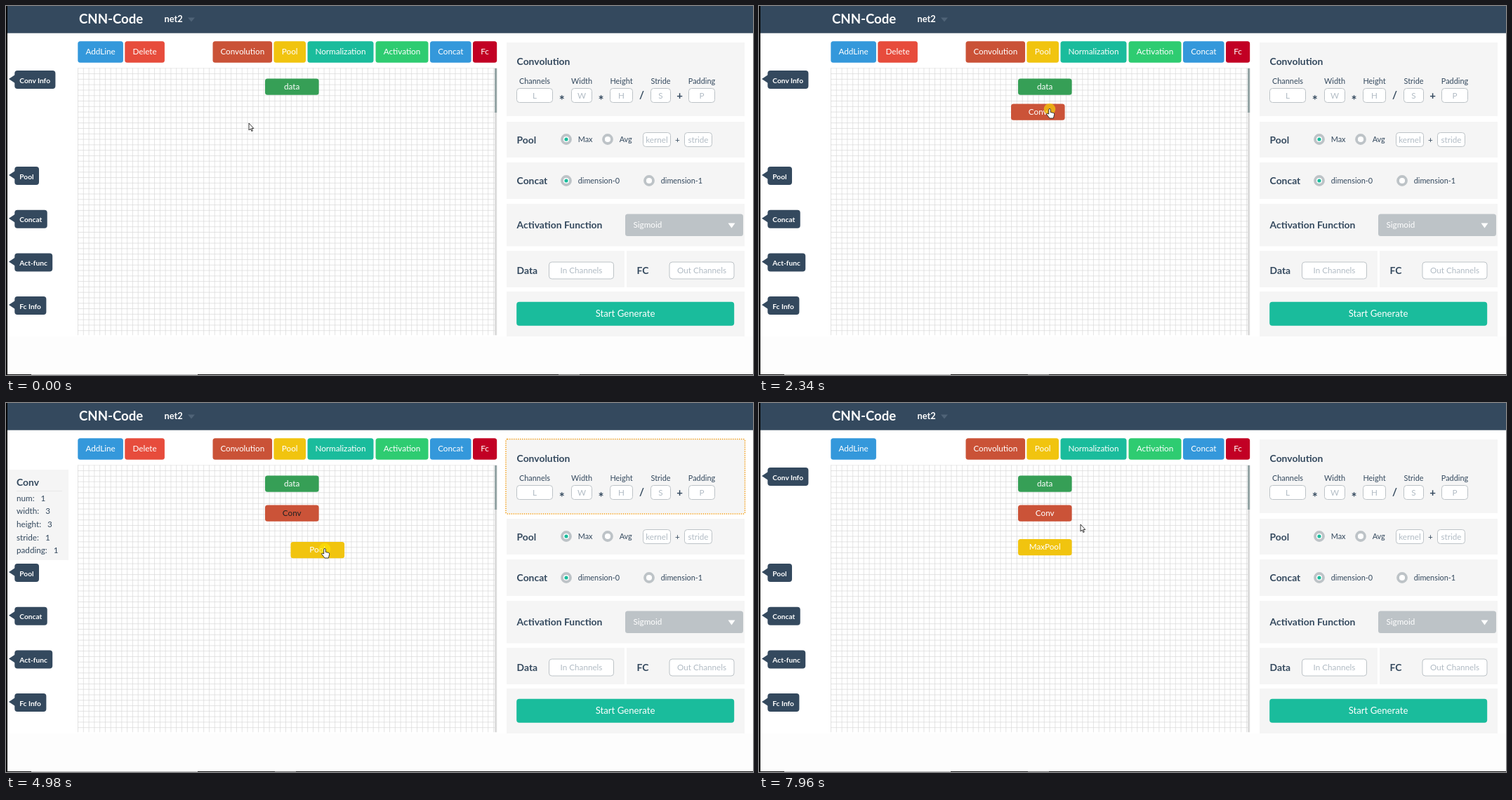
Write an HTML page that moves like this. It is 1064 by 526 pixels and loops after 8 s.

```html
<!DOCTYPE html>
<html lang="en">
<head>
<meta charset="utf-8">
<title>CNN-Code</title>
<style>
html, body { margin: 0; width: 100%; height: 100%; overflow: hidden; background: #fdfdfd; }
svg { display: block; width: 1064px; height: 526px; font-family: Lato, sans-serif; font-size: 11.7px; }
text { white-space: pre; }
.mid { text-anchor: middle; }
.ink { fill: #34495e; }
.head { fill: #34495e; font-weight: 700; font-size: 13.9px; }
.label { fill: #34495e; font-size: 10.9px; }
.sign { fill: #34495e; font-weight: 700; font-size: 15px; text-anchor: middle; }
.star { font-size: 19px; }
.hint { fill: #b2bcc5; }
.white { fill: #fff; }
.title { font-weight: 700; font-size: 18.6px; }
.menu { font-weight: 700; font-size: 12.8px; }
.big { font-size: 13.2px; }
.tip { fill: #fff; font-weight: 700; font-size: 10.2px; }
.outline { stroke: #f0a020; stroke-width: 1.5; stroke-dasharray: 1.5 1.5; }
.pen { fill: #fff; stroke: #222; stroke-width: .9; stroke-linejoin: round; }
</style>
</head>
<body>
<svg id="stage" viewBox="0 0 1064 526"></svg>
<script>
const rect = (x, y, w, h, fill, r = 0, extra = '') =>
  `<rect x="${x}" y="${y}" width="${w}" height="${h}" fill="${fill}" rx="${r}" ${extra}/>`;
const text = (x, y, s, cls = 'ink') => `<text x="${x}" y="${y}" class="${cls}">${s}</text>`;
const path = (d, fill, extra = '') => `<path d="${d}" fill="${fill}" ${extra}/>`;
const group = (id, ...content) => `<g id="${id}">${content.join('')}</g>`;

const button = (x, w, s, fill) => group(s,
  rect(x, 50.3, w, 30.4, fill, 3.5), text(x + w / 2, 69.3, s, 'white mid'));
const badge = (y, s, id) => group(id,
  rect(12.3, y, 40, 26, '#34495e', 4, 'class="fit"'), path(`M4 ${y + 12}l9-6v12z`, '#34495e'),
  text(19.3, y + 17.7, s, 'tip'));
const field = (x, y, w, h, hint) =>
  rect(x + .5, y + .5, w - 1, h - 1, '#fff', 4, 'stroke="#bdc3c7"') +
  text(x + w / 2, y + h / 2 + 4, hint, 'hint mid');
const size = (x, w, name) =>
  text(x + w / 2, 111.3, name, 'label mid') + field(x, 117, w, 21, name === 'Channels' ? 'L' : name[0]);
const radio = (x, y, s, on) =>
  `<circle cx="${x}" cy="${y}" r="6" fill="#fff" stroke="#bdc3c7" stroke-width="3.8"/>` +
  (on ? `<circle cx="${x}" cy="${y}" r="2.6" fill="#1abc9c"/>` : '') +
  text(x + 16.7, y + 4.4, s, 'label');
const node = (id, s, fill) => group(id, rect(0, 0, 76.6, 23.2, fill, 3.5), text(38.2, 15.4, s, 'white mid'));
const info = (id, y, title, rows) => group(id,
  rect(2, y, 87, 35 + rows.length * 18.8, '#f5f5f5'), text(15, y + 23.3, title, 'head'),
  rect(15, y + 30, 65, 1, '#e9e9e9'),
  ...rows.map((row, i) => text(15, y + 44.6 + i * 18.7, row.replace(' ', '\u00a0\u00a0 '))));
const section = (x, y, w, h, title, baseline = y + h / 2 + 5) =>
  rect(x, y, w, h, '#f5f5f5') + text(x + 14.6, baseline, title, 'head');
const outline = (id, y, h) => rect(712, y, 340.5, h, 'none', 2, `id="${id}" class="outline"`);

const header = rect(0, 0, 1064, 38.7, '#34495e') + text(104, 25, 'CNN-Code', 'white title') +
  text(225.5, 23.3, 'net2', 'white menu') + path('M259 16.5h10l-5 6z', '#4f6377');

const toolbar = button(102.3, 64.6, 'AddLine', '#3498db') + button(169.3, 56.6, 'Delete', '#e74c3c') +
  button(294.5, 84.6, 'Convolution', '#ca5237') + button(381.4, 45.6, 'Pool', '#f1c40f') +
  button(429.5, 94, 'Normalization', '#1abc9c') + button(526.5, 75, 'Activation', '#2ecc71') +
  button(604, 58.6, 'Concat', '#3498db') + button(665, 34.2, 'Fc', '#c20024');

const board = `<pattern id="grid" x="102" y="88.3" width="7.79" height="7.79" patternUnits="userSpaceOnUse">
  <path d="M0 .4H7.79M.4 0V7.79" stroke="#d8d8d8" stroke-width=".78"/></pattern>` +
  rect(102, 88.3, 594, 381, 'url(#grid)') + rect(696, 88.3, 3.2, 381, '#dcdcdc') +
  rect(696, 89, 3.2, 63, '#95a5a6');

const forms = section(713, 52, 339, 105, 'Convolution', 83.5) +
  size(727, 52, 'Channels') + text(791.8, 140.5, '*', 'sign star') +
  size(805, 30, 'Width') + text(847.5, 140.5, '*', 'sign star') +
  size(860, 33, 'Height') + text(905.5, 132, '/', 'sign') +
  size(918, 29, 'Stride') + text(959.5, 132.5, '+', 'sign') + size(972, 38, 'Padding') +
  section(713, 165, 339, 51, 'Pool') + radio(798, 190, 'Max', true) + radio(857, 190, 'Avg') +
  field(907, 180, 40, 21, 'kernel') + text(956.5, 195, '+', 'ink mid') + field(966, 180, 40, 21, 'stride') +
  section(713, 223, 339, 52, 'Concat') + radio(798, 249, 'dimension-0', true) + radio(916, 249, 'dimension-1') +
  section(713, 282, 339, 60.5, 'Activation Function') + rect(882, 296.5, 168, 31.5, '#bdc3c7', 3.5) +
  text(893.5, 316.3, 'Sigmoid', 'white') + path('M1028.5 309.5h10l-5 7z', '#fff') +
  section(713, 349, 168, 52, 'Data', 381.5) + field(773, 364.5, 93, 25, 'In Channels') +
  section(884, 349, 168, 52, 'FC', 381.5) + field(944.5, 364.5, 93, 25, 'Out Channels') +
  rect(713, 407, 339, 64, '#f5f5f5') + rect(727.2, 421.7, 310, 34, '#1abc9c', 4) +
  text(882, 443.3, 'Start Generate', 'white mid big') +
  outline('convOutline', 51.5, 106.5) + outline('poolOutline', 164, 53);

const sidebar = badge(92, 'Conv Info', 'convBadge') +
  ['Pool', 'Concat', 'Act-func', 'Fc Info'].map((s, i) => badge(229 + i * 61.7, s, 'badge' + i)).join('') +
  info('convInfo', 95, 'Conv', ['num: 1', 'width: 3', 'height: 3', 'stride: 1', 'padding: 1']) +
  info('poolInfo', 232, 'Pool', ['type: Max']);

const edges = rect(0, 0, 2, 526, '#000') + rect(0, 525, 1064, 1, '#111') +
  rect(36, 525, 237, 1, '#b5b5b5') + rect(0, 525, 30, 1, '#666', 0, 'id="mark"');

const pointer = group('pointer', '<circle id="press" r="8.3" fill="#ffe600" fill-opacity=".6"/>',
  path('M-1.3 7V.8a1.3 1.3 0 0 1 2.6 0V4.5l4 .8q1.5.4 1.4 2l-.8 3.5-.6 2.2h-5.3l-2.3-3-2-2.4q-.4-1.6 1-1.4z',
    '#fff', 'id="hand" class="pen"'),
  path('M0 0V10l2.3-2 1.6 3.5 1.4-.6-1.5-3.4h3z', '#fff', 'id="arrow" class="pen"'));

document.getElementById('stage').innerHTML = rect(0, 0, 1064, 526, '#fdfdfd') + rect(0, 39, 1064, 432, '#fff') +
  header + toolbar + board + forms + sidebar +
  node('dataNode', 'data', '#369f56') + node('convNode', 'Conv', '#cb5338') + node('poolNode', 'Pool', '#f1c40f') +
  edges + pointer;

const find = id => document.getElementById(id);
const show = (id, on) => { find(id).style.display = on ? '' : 'none'; };
const place = (id, [x, y]) => find(id).setAttribute('transform', `translate(${x} ${y})`);

document.querySelectorAll('.fit').forEach(box =>
  box.setAttribute('width', box.parentNode.querySelector('text').getComputedTextLength() + 14.4));
place('dataNode', [369, 103.5]);

// Each move eases from wherever the last one ended.
const move = (from, to, x, y) => ({ from, to, goal: [x, y] });
const easeOut = k => k * (2 - k);
function travel(origin, moves, t) {
  return moves.reduce((at, { from, to, goal }) => {
    const k = easeOut(Math.min(1, Math.max(0, (t - from) / (to - from))));
    return at.map((v, i) => v + (goal[i] - v) * k);
  }, origin);
}

const spawn = [109, 105];
const convDrag = { from: 1630, to: 2640 }, poolDrag = { from: 4450, to: 6350 };
const clicks = [1080, 3180, 3680, 6810, 7810];

const pointerMoves = [move(0, 900, 321, 57.5), move(1160, 1550, 162, 113),
  move(convDrag.from, 2320, 414, 147), move(3340, 3570, 403, 57.5), move(4000, 4440, 162, 113),
  move(poolDrag.from, 4660, 304, 177.5), move(4660, 4970, 454, 208), move(5050, 5600, 420, 205),
  move(6900, 7200, 474, 180), move(7480, 7940, 458, 173)];
const convMoves = [move(convDrag.from, 2320, 359, 139.5), move(2330, 2480, 364, 144),
  move(convDrag.to, convDrag.to + 1, 369, 145.5)];
const poolMoves = [move(poolDrag.from, 4660, 245, 164.5), move(4660, 4970, 405.5, 198),
  move(5050, 5600, 371.5, 195), move(5880, 6030, 367, 195), move(poolDrag.to, poolDrag.to + 1, 369, 194)];

const inside = ([px, py], [x, y], w, h) => px >= x && px <= x + w && py >= y && py <= y + h;

function label(id, s, dark) {
  const el = find(id).querySelector('text');
  el.textContent = s;
  el.style.fill = dark ? '#222' : '';
}

function draw(t) {
  const tick = Math.max(0, Math.floor((t + 12) / 78) * 78 - 12);
  const cursor = travel([346, 167], pointerMoves, tick);
  const conv = travel(spawn, convMoves, tick), pool = travel(spawn, poolMoves, tick);
  place('pointer', cursor);
  place('convNode', conv);
  place('poolNode', pool);
  show('convNode', t >= 1240);
  show('poolNode', t >= 3840);

  const dragging = [convDrag, poolDrag].some(({ from, to }) => t >= from && t < to);
  const pressed = dragging || clicks.some(at => t >= at && t < at + 150);
  const hand = dragging || inside(cursor, [102, 50], 597, 31) ||
    [conv, pool].some(at => inside(cursor, at, 77, 23));
  show('press', pressed);
  show('hand', hand);
  show('arrow', !hand);
  find('Pool').firstChild.setAttribute('fill', inside(cursor, [382, 50], 45, 31) ? '#f4d313' : '#f1c40f');

  const convOn = t >= 3260 && t < 6900, poolOn = t >= 6900 && t < 7890;
  show('convInfo', convOn);
  show('convOutline', convOn);
  show('convBadge', !convOn);
  show('poolInfo', poolOn);
  show('poolOutline', poolOn);
  show('badge0', !poolOn);
  label('convNode', 'Conv', convOn);
  label('poolNode', t < 6900 ? 'Pool' : 'MaxPool', poolOn);
  show('Delete', t < 7890);
  find('mark').setAttribute('x', t < 1080 ? 787 : 383);
}

const start = performance.now();
function loop() {
  draw((performance.now() - start) % 8000);
  requestAnimationFrame(loop);
}
loop();
</script>
</body>
</html>
```
